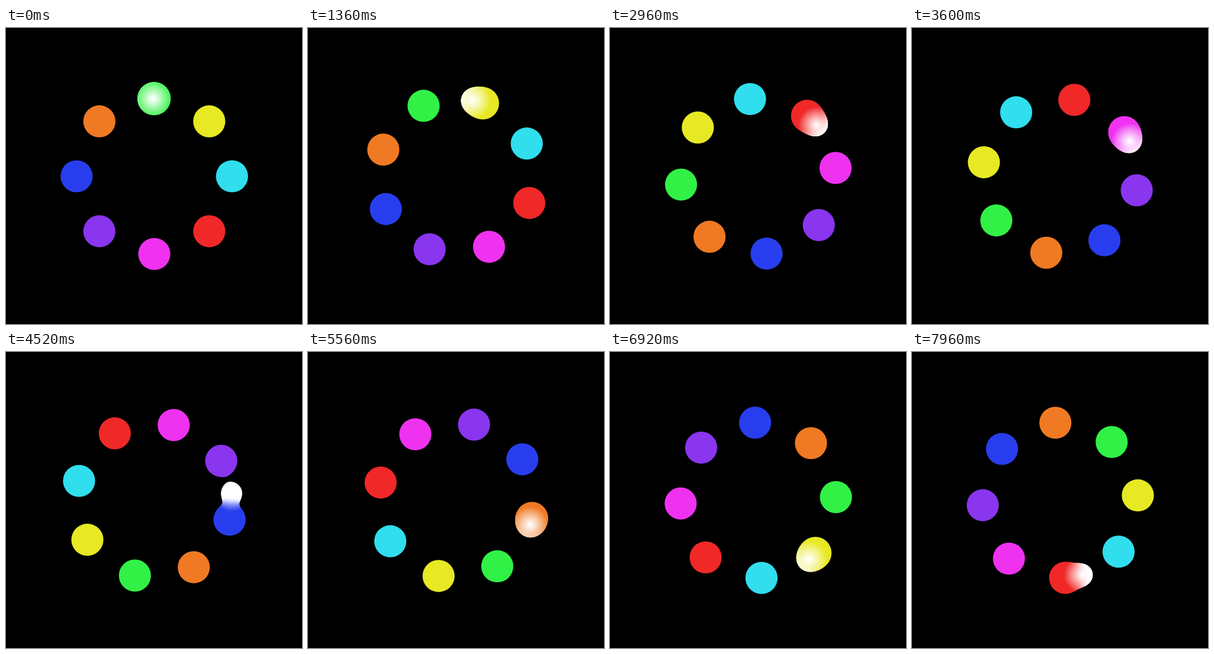
An HTML page with a canvas for the animation above (8000 ms loop, 500x500 px).

```html
<!DOCTYPE html>
<html lang="en">
<head>
<meta charset="utf-8">
<title>Ring of drops</title>
<style>
  html, body { margin: 0; width: 100%; height: 100%; overflow: hidden; background: #000; }
  canvas { display: block; width: 500px; height: 500px; }
</style>
</head>
<body>
<canvas id="stage" width="500" height="500"></canvas>
<script>
const ctx = document.getElementById('stage').getContext('2d');

const LOOP = 8000, STEP = 40, HOLD = 20;
const CENTER = 250.5, ORBIT = 131.25;
const BALL_R = 27.1, GLOW_R = 17.5, STIFF = 1.4;
const RING_SPEED = -1.78, GLOW_SPEED = 0.919, GLOW_START = -0.9;
const PATCH = 132;

// Clockwise from the top
const COLORS = [
  [50, 241, 70], [231, 233, 36], [48, 222, 238], [240, 40, 40],
  [238, 50, 240], [138, 53, 238], [40, 62, 238], [240, 122, 35]
];

const patch = ctx.createImageData(PATCH, PATCH);
const clamp = v => Math.max(0, Math.min(1, v));
const smooth = v => { v = clamp(v); return v * v * (3 - 2 * v); };
const field = (d2, r) => Math.exp(STIFF * (1 - d2 / (r * r)));

function onRing(deg) {
  const a = deg * Math.PI / 180;
  return { x: CENTER + ORBIT * Math.sin(a), y: CENTER - ORBIT * Math.cos(a) };
}

function drawBall(ball) {
  ctx.fillStyle = `rgb(${ball.color})`;
  ctx.beginPath();
  ctx.arc(ball.x, ball.y, BALL_R, 0, 2 * Math.PI);
  ctx.fill();
}

// Melts the white drop into the balls around it
function drawGlow(glow, balls) {
  const left = Math.round(glow.x - PATCH / 2), top = Math.round(glow.y - PATCH / 2);
  const near = balls.filter(b => Math.hypot(b.x - glow.x, b.y - glow.y) < 150);
  const px = patch.data;
  for (let j = 0, i = 0; j < PATCH; j++) {
    for (let n = 0; n < PATCH; n++, i += 4) {
      const x = left + n + 0.5, y = top + j + 0.5;
      const g2 = (x - glow.x) ** 2 + (y - glow.y) ** 2;
      let sum = field(g2, GLOW_R), best = Infinity, color;
      for (const b of near) {
        const d2 = (x - b.x) ** 2 + (y - b.y) ** 2;
        sum += field(d2, BALL_R);
        if (d2 < best) { best = d2; color = b.color; }
      }
      const cover = clamp((sum - 1) * 10 + 0.5);
      const light = clamp(1 - (Math.sqrt(g2) / 31) ** 1.15);
      const body = smooth((40 - Math.sqrt(best)) / 20) * (1 - light);
      const white = light / (light + body || 1);
      for (let c = 0; c < 3; c++) {
        px[i + c] = cover * (color[c] + (255 - color[c]) * white);
      }
      px[i + 3] = 255;
    }
  }
  ctx.putImageData(patch, left, top);
}

function render(time) {
  const k = Math.max(0, Math.floor(time / STEP) - HOLD);
  const balls = COLORS.map((color, i) => ({ ...onRing(i * 45 + RING_SPEED * k), color }));
  ctx.fillStyle = '#000';
  ctx.fillRect(0, 0, 500, 500);
  balls.forEach(drawBall);
  drawGlow(onRing(GLOW_START + GLOW_SPEED * k), balls);
}

const start = performance.now();
function tick() {
  render((performance.now() - start) % LOOP);
  requestAnimationFrame(tick);
}
tick();
</script>
</body>
</html>
```
